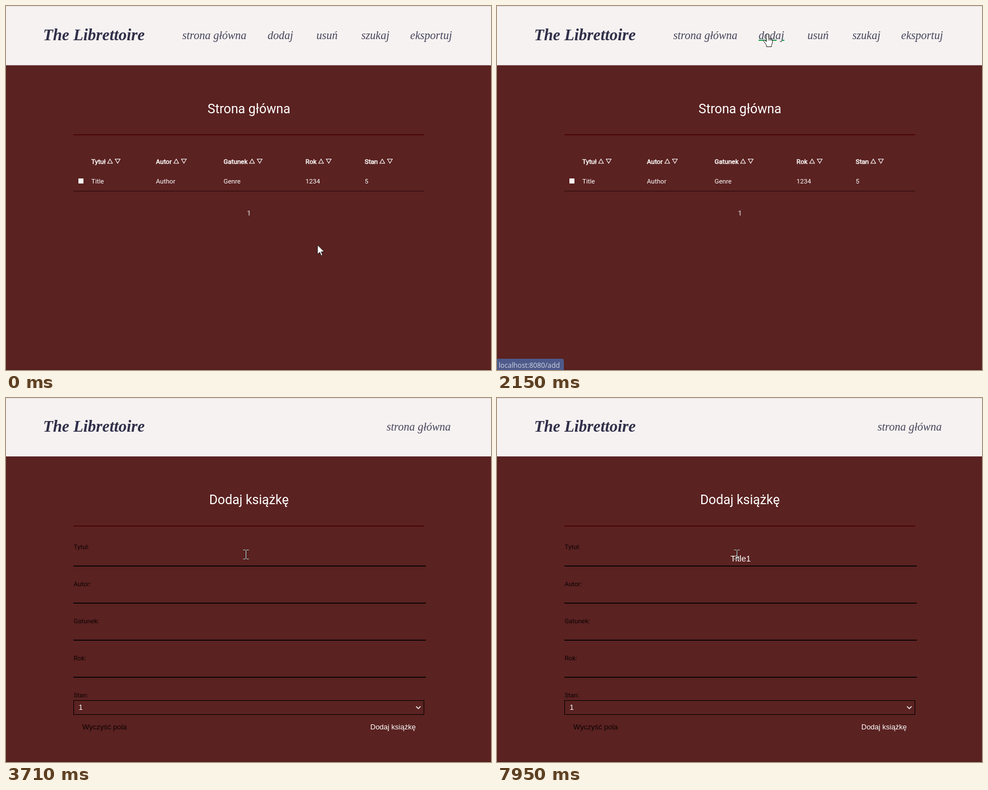
These frames come from a looping animation (864 px wide and 648 px high, 8 s). An HTML page:

```html
<!DOCTYPE html>
<html lang="pl">
<head>
<meta charset="utf-8">
<title>The Librettoire</title>
<style>
  html, body { margin: 0; width: 100%; height: 100%; overflow: hidden; background: #5a2221; }
  svg { display: block; width: 864px; height: 648px; }
  text { white-space: pre; }
  .logo { font: italic bold 29px "Liberation Serif", serif; fill: #302f49; }
  .nav { font: italic 20px "Liberation Serif", serif; fill: #45445a; }
  .title { font: 23px Roboto, sans-serif; fill: #fff; text-anchor: middle; }
  .cell { font: 11.6px Roboto, sans-serif; fill: #fff; }
  .head { stroke: #fff; stroke-width: .5; }
  .sort { fill: none; stroke: #fff; stroke-width: 1.1; }
  .page { font: 700 13px Roboto, sans-serif; fill: #b7a4a4; }
  .label { font: 11.5px Roboto, sans-serif; fill: #0c0303; }
  .control { font: 13px "Liberation Sans", sans-serif; fill: #fff; }
  .typed { font: 15px "Liberation Sans", sans-serif; fill: #fff; text-anchor: middle; }
  .status { font: 12.25px "Open Sans", sans-serif; fill: #d3d6e2; }
  .hint { font: 500 13.5px "Noto Sans", sans-serif; fill: #222; }
  #popup rect { filter: drop-shadow(0 1px 1.5px rgba(0, 0, 0, .5)); }
  #ibeam { mix-blend-mode: difference; }
</style>
</head>
<body>
<svg viewBox="0 0 864 648">
  <rect width="864" height="648" fill="#5a2221"/>
  <rect y="647" width="864" height="1" fill="#481b1b"/>
  <g id="home"></g>
  <g id="add"></g>
  <g id="form">
    <text id="typed" class="typed" x="434" y="291"></text>
    <rect id="caret" width="1" height="18" fill="#fff"/>
    <g id="popup">
      <rect x="120" y="299.5" width="206" height="55.5" rx="4" fill="#fff"/>
      <text class="hint" x="133" y="332.5">Title</text>
    </g>
  </g>
  <g id="status">
    <path d="M0 628H116q3 0 3 3V648H0z" fill="#4d5a8b"/>
    <text class="status" x="3" y="644">localhost:8080/add</text>
  </g>
  <g id="arrow"><path d="M0 0V16.5L4 13L6.5 19L9 18L6.5 12H12Z" fill="#fff" stroke="#111" stroke-width=".9"/></g>
  <g id="hand" stroke="#222" stroke-width="1">
    <path d="M-2 2a2 2 0 0 1 4 0V8l4 1q3 1 3 4l-1 5-1 2v3H-2v-3l-5-7q-1-2 1-2l4 3z" fill="#fff"/>
    <path d="M2 8v4M4.5 8.7v3.3M7 9.5v3" fill="none"/>
  </g>
  <g id="ibeam"><path d="M-5 -7.5H-1M1 -7.5H5M0 -7V8M-5 8.5H-1M1 8.5H5" stroke="#fff" fill="none"/></g>
  <circle id="click" r="13" fill="#ff0" fill-opacity=".47"/>
</svg>
<script>
const LOOP = 8000;
const el = id => document.getElementById(id);
const text = (cls, x, y, str) => `<text class="${cls}" x="${x}" y="${y}">${str}</text>`;
const rect = (x, y, w, h, fill) => `<rect x="${x}" y="${y}" width="${w}" height="${h}" fill="${fill}"/>`;

// Header, page title and rule; links are [label, x] pairs.
const frame = (height, title, links) =>
  rect(0, 0, 864, height, '#f6f2f1') + rect(0, 0, 864, 1, '#dedada') +
  text('logo', 66, height - 44.5, 'The Librettoire') +
  links.map(([label, x]) => text('nav', x, height - 46.5, label)).join('') +
  text('title', 432.8, height + 85, title) +
  rect(120, height + 123, 625, 1.6, '#470009');

const columns = [
  ['Tytuł', 152, 180.5, 'Title'], ['Autor', 267, 298.5, 'Author'], ['Gatunek', 387.5, 433.5, 'Genre'],
  ['Rok', 533.5, 556.5, '1234'], ['Stan', 639, 665.5, '5']
];
el('home').innerHTML =
  frame(105.5, 'Strona główna', [['strona główna', 314], ['dodaj', 466], ['usuń', 553], ['szukaj', 633], ['eksportuj', 720]]) +
  columns.map(([name, x, sortX, value]) =>
    text('cell head', x, 281, name) + text('cell', x, 316, value) +
    `<path class="sort" d="M${sortX + .5} 280h8.6l-4.3-7.5zm13.6-7.5h8.6l-4.3 7.5z"/>`).join('') +
  rect(129, 307, 9, 9, '#f8f4f4') + rect(120, 329, 625, 1, '#2c070a') +
  text('page', 429, 372.5, '1') +
  `<g id="underline">${rect(466, 60, 32, 2, '#20a24c')}${rect(508, 60, 4, 2, '#20a24c')}</g>`;

el('add').innerHTML =
  frame(104, 'Dodaj książkę', [['strona główna', 678]]) +
  ['Tytuł:', 'Autor:', 'Gatunek:', 'Rok:', 'Stan:'].map((name, i) =>
    text('label', 120.5, 269 + 66 * i, name) +
    (i < 4 ? rect(120, 298.4 + 66 * i, 628, 1.6, '#000') : '')).join('') +
  '<rect x="120.5" y="538.5" width="624" height="25" fill="none" stroke="#000"/>' +
  text('control', 129.5, 555, '1') +
  '<path d="M730.5 549l4 4 4-4" fill="none" stroke="#fff" stroke-width="1.5"/>' +
  '<text class="control" x="136" y="590" style="fill:#0c0303">Wyczyść pola</text>' +
  text('control', 649, 590, 'Dodaj książkę');

// Pointer path: time, x, y
const path = [
  [0, 555, 425.5], [50, 555, 424], [230, 555, 411], [510, 555, 411], [640, 625, 345], [780, 673, 250],
  [950, 628.8, 154], [1130, 560, 100], [1310, 507, 71], [1360, 505, 70], [1500, 491, 56],
  [1640, 482.5, 51], [1720, 482, 49.5], [2460, 482, 49.5], [2640, 446, 155], [2840, 424, 263],
  [3020, 427, 277], [3100, 427.5, 278], [LOOP, 427.5, 278]
];
const typing = [[4040, 'T'], [4690, 'Ti'], [4890, 'Tit'], [5020, 'Titl'], [5200, 'Title'], [6000, 'Title1']];
const caretOn = [[3180, 3710], [4040, 4560], [4690, 5710], [6000, 6870], [7380, 7950]];

const within = (t, a, b) => t >= a && t < b;
const ramp = (t, a, b) => Math.min(1, Math.max(0, (t - a) / (b - a)));
const show = (id, on) => el(id).style.display = on ? '' : 'none';

function pointer(t) {
  const i = path.findIndex(p => p[0] > t);
  const [t0, x0, y0] = path[i - 1], [t1, x1, y1] = path[i];
  const k = ramp(t, t0, t1);
  return [x0 + (x1 - x0) * k, y0 + (y1 - y0) * k];
}

function draw(t) {
  const onAdd = t >= 2180, hover = within(t, 1440, 2180), overInput = t >= 2950;
  show('home', !onAdd);
  show('add', onAdd);
  show('form', onAdd);
  show('underline', hover);
  el('status').style.opacity = ramp(t, 1540, 1720) * (1 - ramp(t, 2480, 2720));

  const [x, y] = pointer(t);
  show('arrow', !hover && !overInput);
  show('hand', hover);
  show('ibeam', overInput);
  show('click', within(t, 2000, 2150) || within(t, 3120, 3250));
  for (const id of ['arrow', 'hand', 'click']) el(id).setAttribute('transform', `translate(${x} ${y})`);
  el('ibeam').setAttribute('transform', `translate(${Math.floor(x)}.5 ${Math.round(y)})`);

  const value = typing.reduce((str, [at, next]) => t >= at ? next : str, '');
  if (el('typed').textContent !== value) el('typed').textContent = value;
  const inAuthor = t >= 6360;
  const half = inAuthor || !value ? 0 : el('typed').getComputedTextLength() / 2;
  el('caret').setAttribute('x', Math.floor(434 + half));
  el('caret').setAttribute('y', inAuthor ? 343 : 277);
  show('caret', caretOn.some(([a, b]) => within(t, a, b)));
  show('popup', within(t, 4040, 5200));
}

const start = performance.now();
function tick() {
  draw((performance.now() - start) % LOOP);
  requestAnimationFrame(tick);
}
tick();
</script>
</body>
</html>
```
